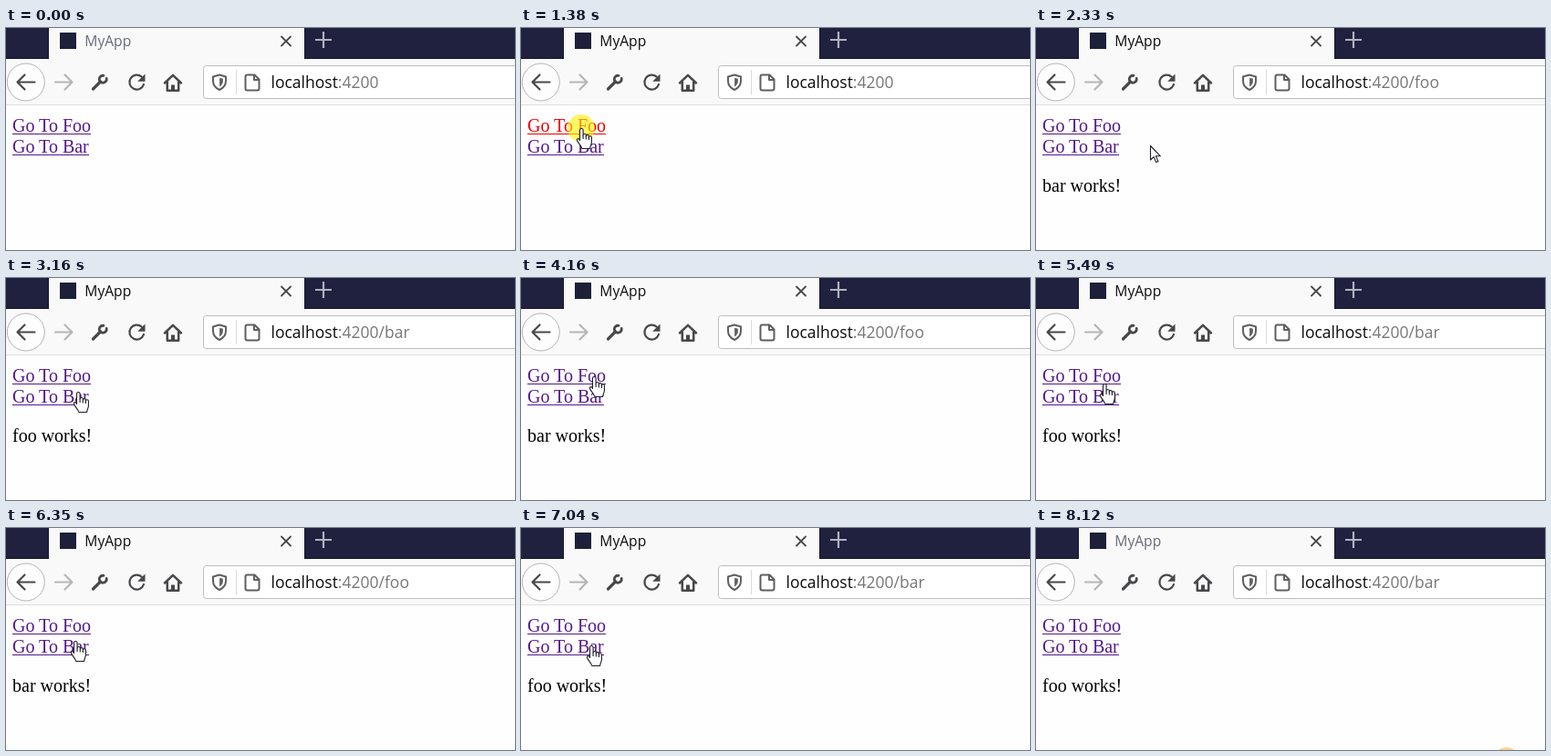
An HTML page that plays this animation: 558 by 244 pixels, repeating every 8.2 s.

```html
<!DOCTYPE html>
<html lang="en">
<head>
<meta charset="utf-8">
<title>MyApp</title>
<style>
  html, body { margin: 0; width: 100%; height: 100%; overflow: hidden; background: #fefefe; }
  svg { display: block; }
  .ui { font-family: "Open Sans", "Noto Sans", sans-serif; }
  .page { font: 20px "Liberation Serif", "Times New Roman", serif; }
  .icon { fill: none; stroke: #48484b; stroke-width: 2.2; stroke-linejoin: round; stroke-linecap: round; }
  .link { fill: #551a8b; }
  .link.active { fill: #ee0000; }
  .cursor { fill: #fff; stroke: #1c1c28; stroke-width: 1.1; stroke-linejoin: round; }
</style>
</head>
<body>
<svg width="558" height="244" viewBox="0 0 558 244">
  <!-- tab strip -->
  <rect width="558" height="34" fill="#20213f"/>
  <path d="M46.5 0V33.5H0M327.5 0V33.5H558" fill="none" stroke="#000" stroke-opacity=".3"/>
  <rect x="47" width="280" height="34" fill="#f9f9fa"/>
  <rect x="59" y="5" width="18" height="18" fill="#1d2038"/>
  <text id="title" class="ui" x="86.3" y="19.5" font-size="15.6">MyApp</text>
  <path class="icon" d="M302 9.5l10 10M312 9.5l-10 10" style="stroke-width:1.8"/>
  <path d="M339 13h18M348 4v18" stroke="#b2b2bf" stroke-width="2.2"/>

  <!-- toolbar -->
  <rect y="34" width="558" height="50" fill="#f9f9fa"/>
  <rect y="84" width="558" height="1" fill="#e0e0e2"/>
  <circle cx="21.8" cy="59.5" r="20.5" fill="#fdfdfd" stroke="#b4b4b6"/>
  <path class="icon" d="M31.5 59.5H13M20.5 51.5l-8 8 8 8"/>
  <path class="icon" d="M54 59.5H72M64.500 51.5l8 8-8 8" style="stroke:#b6b6b8"/>
  <path class="icon" d="M95.5 67l8-8" style="stroke-width:3.2"/>
  <path class="icon" d="M107 52.3a4 4 0 1 0 3.200 3.200" style="stroke-width:2.8"/>
  <path class="icon" d="M151 62A8 8 0 1 1 148.700 53.600"/>
  <path d="M152.5 50.5v8.300h-8.300z" fill="#48484b"/>
  <path class="icon" d="M174 60.5L183 51.800l9 8.700M176.800 59.5V68.800H189.200V59.5" style="stroke-width:2.5"/>
  <rect x="181" y="62.5" width="4" height="6" fill="#48484b"/>
  <rect x="216.5" y="41.5" width="360" height="36" rx="3" fill="#fff" stroke="#bdbdbf"/>
  <g class="icon" style="stroke:#5f5f62;stroke-width:2">
    <path d="M234 51.5L241 53.5V58C241 63 238.500 66 234 68C229.500 66 227 63 227 58V53.5Z"/>
    <path d="M234.500 55.5V64C236.500 62.5 237.500 60.5 237.500 58V56.300Z" fill="#5f5f62" style="stroke-width:.8"/>
    <path d="M264.500 51.5H272.500L277.500 56.5V66.5a2 2 0 0 1-2 2H264.500a2 2 0 0 1-2-2V53.5a2 2 0 0 1 2-2zM272 52V57H277"/>
  </g>
  <rect x="252" y="46" width="1" height="27" fill="#d9d9dc"/>
  <text class="ui" x="290.5" y="66" font-size="17.500" fill="#0c0c0d">localhost<tspan id="path" fill="#77777a"></tspan></text>

  <!-- page -->
  <g class="page">
    <g id="foo" class="link">
      <text x="7" y="114.400">Go To Foo</text><rect x="7" y="116" width="86" height="1"/>
    </g>
    <g id="bar" class="link">
      <text x="7" y="137.400">Go To Bar</text><rect x="7" y="139" width="84" height="1"/>
    </g>
    <text id="body" x="7" y="180.400"></text>
  </g>

  <circle id="spot" r="15"/>
  <g id="pointer" class="cursor">
    <path id="arrow" d="M.5 .5V16l3.600-3.400 2.600 6 2.300-1-2.600-5.800h5z"/>
    <g id="hand">
      <path d="M-1.500 13.500V2.300a1.800 1.800 0 0 1 3.600 0V8a1.600 1.600 0 0 1 3.200 .3V9a1.500 1.500 0 0 1 3.100 .3V10.200a1.500 1.500 0 0 1 3 .2V15.500C11.400 18 10 19 9.600 22.500H.8C.5 20-3 17-4.600 13.500C-5 11.800-3.200 11-2.300 12.200Z"/>
      <path d="M2.100 8v4M5.300 9v3.500M8.400 10v3" fill="none"/>
    </g>
  </g>
</svg>
<script>
const LOOP = 8200, SHOW = 300, LEAVE = 8120, FOCUS = 1310;

// start, end, steps, x, y, ease-out power
const moves = [
  [300, 300, 1, 199, 131],
  [380, 380, 1, 144, 121],
  [680, 1140, 7, 66, 110],
  [1920, 2240, 5, 129, 131],
  [2330, 2330, 1, 125, 129],
  [2400, 2700, 5, 84, 126],
  [2780, 2930, 3, 79, 125],
  [3470, 3780, 5, 80, 108],
  [4330, 4700, 6, 77, 127],
  [5330, 5730, 6, 72, 105],
  [6180, 6580, 6, 77, 129, 2.4],
  [7360, 7590, 4, 437, 218]
];

// press, full highlight, release, link
const clicks = [
  [1310, 1380, 1540, "foo"],
  [3010, 3010, 3160, "bar"],
  [3930, 4010, 4160, "foo"],
  [4940, 4940, 5100, "bar"],
  [5870, 5950, 6100, "foo"],
  [6810, 6870, 7040, "bar"]
];

const result = { foo: "bar works!", bar: "foo works!" };
const $ = id => document.getElementById(id);
const show = (el, on) => el.setAttribute("visibility", on ? "visible" : "hidden");

function cursorAt(t) {
  let x = 0, y = 0;
  for (const [start, end, n, toX, toY, power = 1] of moves) {
    if (t < start) break;
    const gap = (end - start) / (n - 1 || 1);
    const k = gap ? Math.min(n, Math.floor((t - start) / gap + 1e-6) + 1) : n;
    const p = 1 - (1 - k / n) ** power;
    x += (toX - x) * p;
    y += (toY - y) * p;
  }
  return [Math.round(x), Math.round(y)];
}

function drawSpot(x, y, color, opacity) {
  const spot = $("spot");
  spot.setAttribute("cx", x);
  spot.setAttribute("cy", y);
  spot.setAttribute("fill", color);
  spot.setAttribute("fill-opacity", opacity);
}

function draw(t) {
  const [x, y] = cursorAt(t);
  const visible = t >= SHOW && t < LEAVE;
  const overLink = x < 94 && y > 97 && y < 141;
  $("pointer").setAttribute("transform", `translate(${x} ${y})`);
  show($("arrow"), visible && !overLink);
  show($("hand"), visible && overLink);

  const press = clicks.find(c => t >= c[0] && t < c[2]);
  for (const id of ["foo", "bar"]) {
    $(id).classList.toggle("active", !!press && press[3] === id);
  }
  if (press) drawSpot(x, y, "#fff000", t < press[1] ? 0.35 : 0.6);
  else if (t >= LEAVE) drawSpot(516, 256, "#f5c26b", 0.7);
  show($("spot"), press || t >= LEAVE);

  const route = clicks.filter(c => t >= c[2]).map(c => c[3]).pop();
  $("path").textContent = ":4200" + (route ? "/" + route : "");
  $("body").textContent = route ? result[route] : "";
  $("title").setAttribute("fill", t >= FOCUS && t < LEAVE ? "#0c0c0d" : "#686a78");
}

function tick() {
  draw(performance.now() % LOOP);
  requestAnimationFrame(tick);
}
tick();
</script>
</body>
</html>
```
